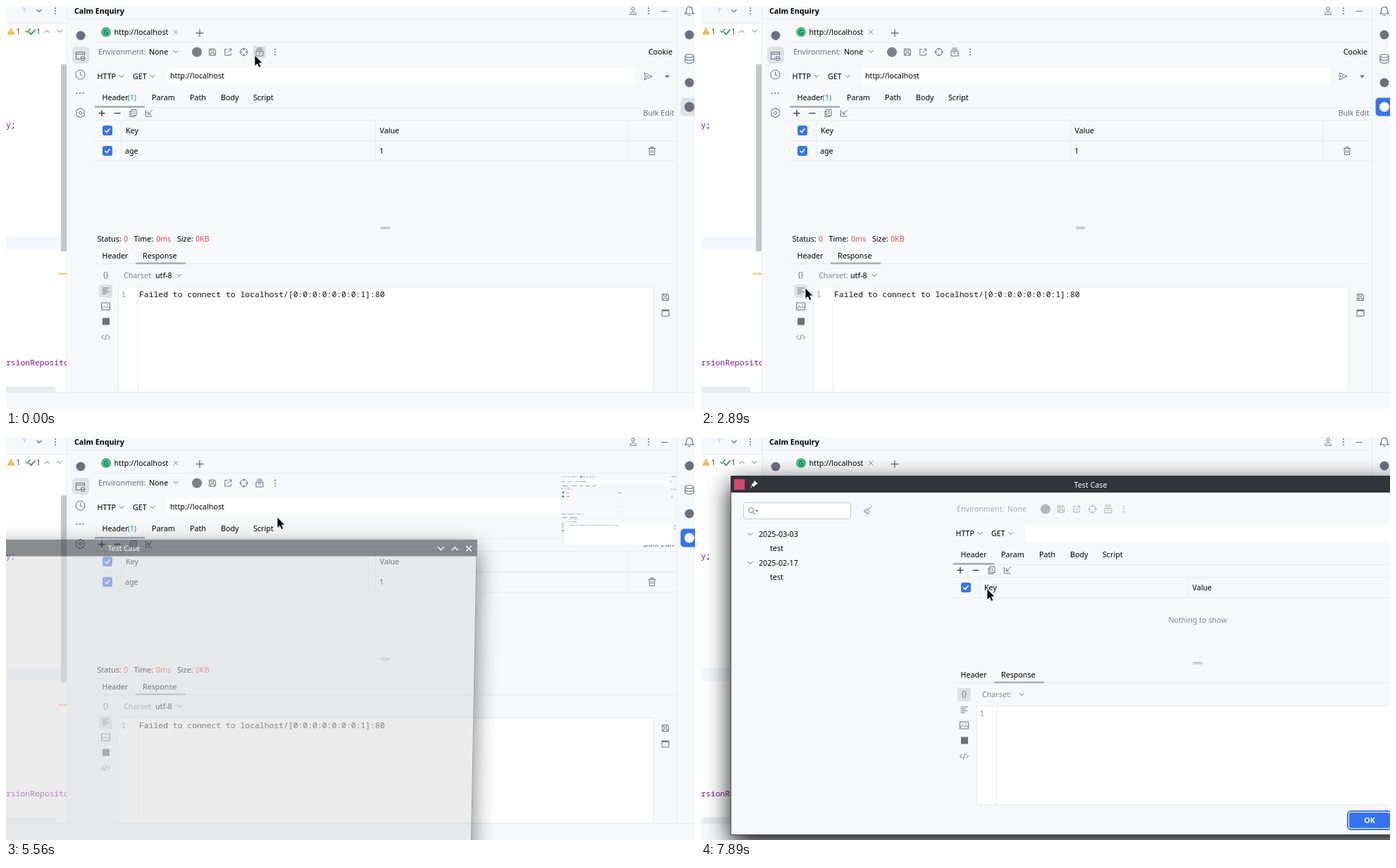
Recreate the animation shown at these times as an HTML page. Size 978 by 573 pixels, loop 8000 ms.

```html
<!DOCTYPE html>
<html lang="en">
<head>
<meta charset="utf-8">
<title>Test case demo</title>
<style>
html, body { margin: 0; width: 100%; height: 100%; overflow: hidden; background: #f7f8fa; }
svg { display: block; width: 978px; height: 573px; }
text { font: 10.7px "Noto Sans", "Open Sans", sans-serif; white-space: pre; }
.mono { font: 11.4px "Noto Sans Mono", "DejaVu Sans Mono", monospace; }
.bold { font-weight: 700; }
</style>
</head>
<body>
<svg id="stage" viewBox="0 0 978 573"></svg>
<script>
const GREY = '#6c707e', PALE = '#a8adbd', LINE = '#e9ebef', BG = '#f7f8fa', HOVER = '#dfe1e5', BLUE = '#3574f0';

const icons = {
  down: 'M-3.5-2 0 1.5 3.5-2',
  up: 'M-3.5 2 0-1.5 3.5 2',
  close: 'M-3-3 3 3M3-3-3 3',
  plus: 'M-4.5 0H4.5M0-4.5V4.5',
  minus: 'M-4.5 0H4.5',
  save: 'M-4.5-4.5H3L4.5-3V4.5H-4.5zM-2.5-4.5V-1.5H2V-4.5M-2.5 4.5V1H2.5V4.5',
  open: 'M-1-4H-4.5V4.5H4V1M1-4.5H4.5V-1M4.5-4.5-1 1',
  aim: 'M5 0A5 5 0 1 1-5 0A5 5 0 1 1 5 0M0-6V-2.5M0 6V2.5M-6 0H-2.5M6 0H2.5',
  stack: 'M-3.5-5.5H3.5M-4.5-3.2H4.5M-5-1H5V5.5H-5zM-2 1.5H2',
  copy: 'M-2.5-5H4.5V3H-2.5zM-2.5-3H-4.5V5H2.5V3M-.5-2.5H2.5M-.5 0H2.5',
  import: 'M-4.5-4.5V4.5H4.5M5-5-1.5 1.5M-1.5-2.5V1.5H2.5',
  trash: 'M-5-3.5H5M-2-3.5V-5.5H2V-3.5M-4-3.5-3.5 5.5H3.5L4-3.5M-1.3-1V3M1.3-1V3',
  send: 'M-5-5 6 0-5 5-3.5 0zM-3.5 0H1',
  lines: 'M-5-4H5M-5-1.3H2M-5 1.3H5M-5 4H1',
  image: 'M-6-5H6V5H-6zM-6 3.5-2-.5 1 2 3 .5 6 3M1.5-2H3',
  code: 'M-3-3-6 0-3 3M3-3 6 0 3 3M1.3-4-1.3 4',
  frame: 'M-5-4.5H5V4.5H-5zM-5-3H5M-5-3.8H5',
  clock: 'M6.5 0A6.5 6.5 0 1 1-6.5 0A6.5 6.5 0 1 1 6.5 0M0-4V.5L3 2',
  globe: 'M-.5 4.5H-6V-5.5H6V-1M-6-2.8H6M6.5 3.5A3 3 0 1 1 .5 3.5A3 3 0 1 1 6.5 3.5M.5 3.5H6.5',
  gear: 'M-1.5-6.5H1.5L2-4.6 4.5-5 6.2-2.2 4.8 0 6.2 2.2 4.5 5 2 4.6 1.5 6.5H-1.5L-2 4.6-4.5 5-6.2 2.2-4.8 0-6.2-2.2-4.5-5-2-4.6zM2 0A2 2 0 1 1-2 0A2 2 0 1 1 2 0',
  person: 'M2.2-3A2.2 2.2 0 1 1-2.2-3A2.2 2.2 0 1 1 2.2-3M-4.5 5C-4.5 0 4.5 0 4.5 5z',
  bell: 'M-6 4C-4 2-4 1-4-2C-4-7 4-7 4-2C4 1 4 2 6 4zM-1.5 6.5H1.5',
  db: 'M-6-4C-6-7 6-7 6-4V4C6 7-6 7-6 4zM-6-4C-6-1 6-1 6-4M-6 0C-6 3 6 3 6 0',
  broom: 'M5-6 0-1M-1.5-2.5 2 1 0 5-6 1zM-3 2-1.5 0',
  find: 'M1.5-1A3.5 3.5 0 1 1-5.5-1A3.5 3.5 0 1 1 1.5-1M.8 1.8 4 5M4.5-.5H8L6.2 1.2z',
  pin: 'M1-5 5-1 2 0 0 3-3 0 0-2zM-2 1.5-5 5',
  check: 'M-3.5 0-1 2.5 3.5-2.8'
};

const icon = (name, x, y, color = GREY, width = 1, fill = 'none', scale = 1) =>
  `<path transform="translate(${x} ${y}) scale(${scale})" d="${icons[name]}" stroke="${color}" stroke-width="${width}" fill="${fill}"/>`;
const text = (x, y, s, color = '#000', attrs = '') =>
  `<text x="${x}" y="${y + 3.8}" fill="${color}" ${attrs}>${s}</text>`;
const rect = (x, y, w, h, fill, attrs = '') =>
  `<rect x="${x}" y="${y}" width="${w}" height="${h}" fill="${fill}" ${attrs}/>`;
const dot = (x, y, r, fill, attrs = '') => `<circle cx="${x}" cy="${y}" r="${r}" fill="${fill}" ${attrs}/>`;
const hline = (x1, x2, y) => rect(x1, y, x2 - x1, 1, LINE);
const vline = (x, y1, y2) => rect(x, y1, 1, y2 - y1, LINE);
const dots = (x, y, color = GREY) => [-4, 0, 4].map(d => dot(x, y + d, 1, color)).join('');
const checkbox = (x, y) => rect(x - 7, y - 7, 14, 14, BLUE, 'rx="3"') + icon('check', x, y, '#fff', 1.6);
const END = 'text-anchor="end"', MID = 'text-anchor="middle"', MONO = 'class="mono"', BOLD = 'class="bold"';

// Request editor, used by the tool window and by the dialog
function panel({ r, col, trash, dy, bottom, empty }) {
  const c = empty ? PALE : GREY, shift = empty ? -14 : 0, tab = empty ? -13 : 0;
  let s = rect(125, 52, r - 125, bottom + dy - 52, BG);
  s += text(131, 65, 'Environment:', c) + text(203, 65, 'None', empty ? PALE : '#000');
  if (!empty) s += icon('down', 241, 65) + rect(351, 57, 18, 17, HOVER, 'rx="3" id="hover"');
  s += dot(271 + shift, 65.5, 7, empty ? '#b4b7bf' : '#7d808a');
  ['save', 'open', 'aim', 'stack'].forEach((n, i) => s += icon(n, 293 + shift + i * 22.3, 65.5, c));
  s += dots(382 + shift, 65.5, c) + text(r - 6, 65.5, 'Cookie', empty ? PALE : '#000', END);

  s += text(129.5, 100, 'HTTP') + icon('down', 164, 100) + text(180, 100, 'GET') + icon('down', 208, 100);
  s += rect(228.5, 88, r - 59 - 228.5, 23, '#fff');
  if (!empty) s += text(233, 99.5, 'http://localhost');
  s += icon('send', r - 41, 100) + `<path d="M${r - 17} 98.5h7l-3.5 4z" fill="${GREY}"/>`;

  s += text(136.5, 130, 'Header') + (empty ? '' : text(172.5, 130, '(1)', '#1f8ea0'));
  [['Param', 207], ['Path', 261], ['Body', 305], ['Script', 351]].forEach(([n, x]) => s += text(x + tab, 130, n));
  s += hline(125, r, 144) + rect(126, 142, empty ? 58 : 71, 2.6, PALE);
  s += icon('plus', 136, 152.5, '#3c3f47', 1.4) + icon('minus', 158, 152.5, '#3c3f47', 1.4);
  s += icon('copy', 180.5, 152.5) + icon('import', 203, 152.5);
  s += text(r - 3.5, 152.5, 'Bulk Edit', GREY, END);

  const end = empty ? 192 : 221;
  s += hline(125, r, 162) + hline(125, r, 191) + vline(163, 163, end) + vline(col, 163, end) + vline(trash, 163, end);
  s += checkbox(144, 177) + text(170, 177, 'Key') + text(col + 6.5, 177, 'Value');
  if (empty) {
    s += text((125 + r) / 2, 223.5, 'Nothing to show', '#818594', MID);
  } else {
    s += hline(125, r, 220) + checkbox(144, 206) + text(169, 206, 'age') + text(530, 206, '1');
    s += icon('trash', 917, 206);
  }

  const mid = (125 + r) / 2, hy = empty ? 338.5 : 315.5;
  s += `<g transform="translate(0 ${dy})">`;
  s += `<path d="M${mid - 6.5} ${hy - 1}h13m-13 2h13" stroke="#a3a6af"/>`;
  if (!empty) {
    [['Status:', 129.5, '0', 167], ['Time:', 181.5, '0ms', 213], ['Size:', 243, '0KB', 269]]
      .forEach(([k, x, v, vx]) => s += text(x, 331, k) + text(vx, 331, v, '#dc4f45'));
  }
  s += text(136.5, 355, 'Header') + text(194, 355, 'Response');
  s += hline(125, r, 366) + rect(184, 364.6, 71, 2.6, PALE);
  s += rect(132, empty ? 374 : 396, 19, 18.5, HOVER, 'rx="3"');
  s += text(141.5, 382.5, '{}', GREY, MID) + icon('lines', 141.5, 405) + icon('image', 141.5, 427);
  s += rect(137, 443.5, 10, 10, GREY) + icon('code', 141.5, 471);
  s += text(167, 383, 'Charset:', '#818594');
  s += empty ? icon('down', 223, 383) : text(212, 383, 'utf-8') + icon('down', 246, 383);
  s += rect(159.5, 399.5, r - 33 - 159.5, bottom - 399.5, '#fff', `stroke="${LINE}"`) + vline(187, 400, bottom);
  s += text(163.5, 410, '1', '#8f939e', MONO);
  if (!empty) s += text(189, 410, 'Failed to connect to localhost/[0:0:0:0:0:0:0:1]:80', '#111', MONO);
  s += icon('save', r - 16, 414) + icon('frame', r - 16, 436.5);
  return s + '</g>';
}

function background() {
  let s = rect(0, 0, 978, 573, BG) + rect(0, 24, 87, 525, '#fff') + hline(0, 86, 24);
  s += '<path d="M23 3h3v6m0-3 3-3" stroke="#a9cdec" fill="none"/>' + icon('down', 47, 7, GREY, 1.2) + dots(70, 7);
  s += '<path d="M7 30.5 12.5 40.5H1.5z" fill="#f0b240"/><path d="M7 34v3m0 1v1.2" stroke="#fff"/>';
  s += text(14.5, 36, '1', '#444') + icon('check', 31, 35, '#45a05a', 1.5) + icon('check', 37, 37, '#45a05a', 1.5, 'none', 1.3);
  s += text(43, 36, '1', '#444') + icon('up', 58, 36) + icon('down', 76, 36);
  s += rect(0, 328, 78, 19, '#f3f6fc') + rect(78, 83, 8, 266, '#c6c7ca') + rect(74, 379.8, 12, 1.8, '#efc35c');
  s += text(0, 169.5, 'y<tspan fill="#111">;</tspan>', '#871094', MONO);
  s += text(0, 507, 'rsionReposito', '#871094', MONO) + rect(0, 541, 70.5, 8, '#ebecf0');
  s += rect(86, 0, 867, 549, BG) + vline(86, 0, 549) + vline(952, 0, 549) + hline(0, 978, 549);

  s += text(97, 7, 'Calm Enquiry', '#000', BOLD) + icon('person', 890, 7) + dots(912, 7) + icon('minus', 934.5, 7.5);
  s += hline(87, 952, 18);
  s += dot(106, 42, 6.5, GREY) + rect(94, 58, 24, 24, HOVER, 'rx="5"') + icon('globe', 105.5, 71);
  s += icon('clock', 105.5, 97.5) + [-4.5, 0, 4.5].map(d => dot(105 + d, 124, 1, GREY)).join('') + icon('gear', 105.5, 152);
  s += dot(142, 37, 7, '#3fbf86') + text(142, 37, 'G', '#174a35', MID + ' style="font-size:9px"');
  s += text(153.5, 37, 'http://localhost') + icon('close', 241, 37, '#8f939e') + icon('plus', 275, 38.5, GREY, 1.1, 'none', 1.2);
  s += hline(125, 952, 51);

  s += icon('bell', 970, 7, GREY, 1.2) + dot(970, 41, 6.5, GREY) + icon('db', 970, 75, GREY, 1.2) + dot(970, 109, 6.5, GREY);
  s += rect(957.5, 130.5, 26, 26, HOVER, 'rx="5" id="tool"') + dot(970, 143.5, 7, GREY, 'id="toolMark"');
  return s;
}

function dialog() {
  let s = rect(0, 11, 1022, 511, '#000', 'opacity=".95" filter="url(#blur)"');
  s += rect(0, -1, 1022, 511, '#dcdcdc', 'id="body"');
  s += '<g id="content">' + rect(18.5, 37.5, 152, 23, '#fff', 'rx="3" stroke="#c4c8d1"') + icon('find', 31, 49);
  s += icon('broom', 195, 48.5);
  [['2025-03-03', 82], ['2025-02-17', 123]].forEach(([d, y]) =>
    s += icon('down', 28, y) + text(40, y, d) + text(56, y + 20, 'test'));
  s += '<g transform="translate(190 -19)">' +
    panel({ r: 821, col: 459, trash: 754, dy: -54, bottom: 540, empty: true }) + '</g>';
  s += rect(876, 476, 62, 26, '#fff', `rx="5" stroke="${BLUE}" stroke-width="2"`);
  s += rect(878, 478, 58, 22, BLUE, 'rx="3"') + text(907, 489, 'OK', '#fff', MID + ' ' + BOLD) + '</g>';
  s += rect(.5, -.5, 1021, 510, 'none', 'stroke="#4a4f54"');
  s += rect(0, -1, 1022, 24, '#30353a', 'rx="2"');
  s += rect(5, 4, 15, 15, '#d6486e') + icon('pin', 33, 11.5, '#fff', 1, '#fff');
  s += text(511, 12, 'Test Case', '#fcfcfc', MID);
  [['down', 969.5], ['up', 990], ['close', 1010]].forEach(([n, x]) => s += icon(n, x, 12, '#fff', 1.1, 'none', 1.3));
  return s;
}

const stage = document.getElementById('stage');
stage.innerHTML = `
<defs><filter id="blur" x="-10%" y="-20%" width="120%" height="140%"><feGaussianBlur stdDeviation="17"/></filter></defs>
${background()}
<g id="main">${panel({ r: 952, col: 524, trash: 883, dy: 0, bottom: 549 })}</g>
<use id="thumb" href="#main"/>
<g id="menu">
  ${rect(350.5, 75.5, 121, 55, '#fff', 'stroke="#b9bdc6"')}
  <rect id="pick" x="358" width="106" height="20" rx="2" fill="#d3e1fd"/>
  ${text(364.5, 93, 'Save Test Case', '#3a3d44', 'font-weight="500"')}${text(364.5, 113.5, 'Manager Test Case', '#3a3d44', 'font-weight="500"')}
</g>
<g id="popup">
  ${rect(11.5, 380, 314, 66.5, BG, 'stroke="#a9adb8"')}
  ${text(169.5, 397.5, 'Test Case Name', '#000', MID + ' class="bold" style="font-size:10.2px"')}
  <text id="typed" x="27" y="429" fill="#222"></text>
  <rect id="caret" y="419" width="1" height="13" fill="#111"/>
</g>
<g id="dialog">${dialog()}</g>
<path id="arrow" d="M0 0V15.5L3.6 12.2 6 17.5 8.8 16.3 6.4 11H11.2z" fill="#000" stroke="#fff" stroke-width=".8"/>
<path id="fist" d="M-6-4C-5-8-2-8-1-7C1-9 3-8 4-6C7-7 8-4 7 1C7 4 5 5 5 8H-3C-4 5-7 3-7 0C-7-2-6-2-6-4z" fill="#000" stroke="#fff" stroke-width=".8"/>`;

const el = id => document.getElementById(id);
const show = (id, a) => { el(id).style.opacity = a; el(id).style.display = a > 0 ? '' : 'none'; };
const move = (id, x, y, more = '') => el(id).setAttribute('transform', `translate(${x} ${y}) ${more}`);

// Keys are [tick, x, y]; one tick is a ninth of a second
const cursorPath = [[0, 353, 70], [1, 353, 70], [6, 385, 94], [10, 385, 94], [17, 148, 401], [26, 148, 401],
  [31, 420, 281], [37, 357, 70], [40, 362, 66], [42, 366, 69], [47, 385, 114], [50, 385, 114], [55, 183, 245],
  [58, 140, 163], [59, 140, 163], [60, 236, 150], [62, 446, 116], [64, 621, 62], [67, 500, 118], [71, 406, 216]];
const dialogPath = [[0, -343, 143], [60, -343, 143], [62, -133, 110], [64, 42, 56]];

function along(keys, n) {
  const i = keys.findIndex(k => k[0] > n);
  if (i < 0) return keys[keys.length - 1].slice(1);
  const [t0, x0, y0] = keys[i - 1], [t1, x1, y1] = keys[i], p = (n - t0) / (t1 - t0);
  return [x0 + (x1 - x0) * p, y0 + (y1 - y0) * p];
}

function draw(n) {
  const inside = (a, b) => n >= a && n < b;
  const [cx, cy] = along(cursorPath, n), drag = inside(60, 65);
  move('arrow', cx, cy);
  move('fist', cx, cy);
  show('arrow', drag ? 0 : 1);
  show('fist', drag ? 1 : 0);

  show('hover', inside(0, 10) || inside(37, 48) ? 1 : 0);
  const focus = inside(1, 8) || inside(24, 52);
  el('tool').setAttribute('fill', focus ? BLUE : HOVER);
  el('toolMark').setAttribute('fill', focus ? '#fff' : GREY);

  show('menu', inside(1, 10) || inside(40, 48) ? 1 : n === 10 ? .5 : 0);
  el('pick').setAttribute('y', inside(45, 49) ? 103.5 : 83);
  show('thumb', inside(38, 53) ? 1 : 0);
  move('thumb', 762, n < 48 ? 49 : 43.5, 'scale(.2)');

  show('popup', n < 11 || n > 24 ? 0 : n === 24 ? .55 : Math.min(1, (n - 10) / 3));
  const len = n < 18 ? 0 : n < 20 ? 2 : n < 24 ? 3 : 4;
  el('typed').textContent = 'test'.slice(0, len);
  el('caret').setAttribute('x', [27, 31, 37.5, 43, 46][len]);

  // The dialog glides in, slightly tilted, then is dragged
  const a = Math.max(0, Math.min(1, (n - 48.6) / 2.5)), q = 2.2 * (1 - a), s = 1 - .02 * q;
  const [dx, dy] = along(dialogPath, n);
  show('dialog', a);
  el('dialog').setAttribute('transform', `matrix(${s} 0 ${-.0188 * q} ${s} ${dx + 10 * q} ${dy + 4 * q})`);
  el('body').setAttribute('fill', n < 53 ? '#dcdcdc' : BG);
  show('content', n < 53 ? 0 : 1);
}

let last = -1;
function tick() {
  const n = Math.floor((performance.now() % 8000) * 9 / 1000 + .05) % 72;
  if (n !== last) draw(last = n);
  requestAnimationFrame(tick);
}
draw(0);
tick();
</script>
</body>
</html>
```
